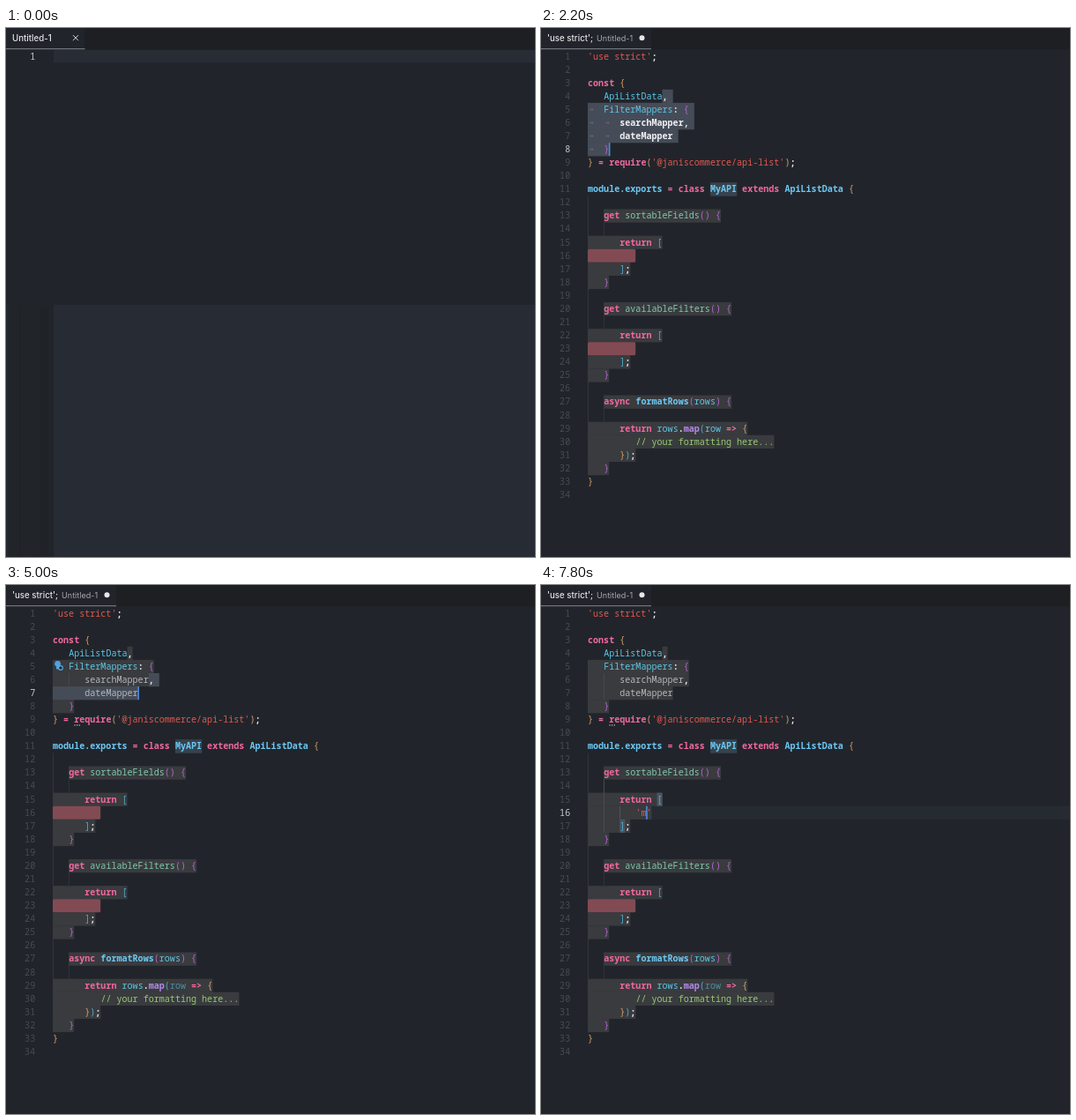
These frames come from a looping animation (600x600 px, 8 s). An HTML page:

```html
<!DOCTYPE html>
<html lang="en">
<head>
<meta charset="utf-8">
<title>Snippet in a code editor</title>
<style>
  html, body { margin: 0; width: 100%; height: 100%; overflow: hidden; background: #21252b; }
  svg { display: block; width: 600px; height: 600px; }
  text { font: 500 10.07px "Noto Sans Mono", "DejaVu Sans Mono", monospace; fill: #c9ccd2; white-space: pre; }
  .ui { font: 500 9.7px Inter, "Open Sans", sans-serif; fill: #e4e5e7; }
  .faint { font-size: 9.1px; font-weight: 400; fill: #a3a6aa; }
  .num { fill: #464b53; text-anchor: end; }
  .num.on { fill: #c6c9ce; }
  .note { font-size: 8.6px; fill: #85888e; text-anchor: end; }
  .gone { fill: #777a80; text-decoration: line-through; }
  .b { font-weight: 800; fill: #f1f2f4; }
  .k { fill: #f2689f; font-weight: 700; }
  .s { fill: #e4574f; }
  .c { fill: #5cc5e6; }
  .m { fill: #6cc8f4; font-weight: 600; }
  .f { fill: #7fc8ad; }
  .o { fill: #d79d68; }
  .p { fill: #b566cc; }
  .l { fill: #4fa9cd; }
  .v { fill: #b48ae8; font-weight: 600; }
  .g { fill: #98ca70; }
  .w { fill: #e8eaed; font-weight: 600; }
  .u { fill: #f0f1f3; font-weight: 600; }
  .r { fill: #5cc5e6; }
  .dim .u { fill: #b3b6bb; font-weight: 500; }
  .dim .r { fill: #4a8fa4; }
</style>
</head>
<body>
<svg id="stage" viewBox="0 0 600 600"></svg>
<script>
(() => {
const LOOP = 8000, LEFT = 53, CHAR = 6.042, PITCH = 15.076;
const stage = document.getElementById('stage');

const rowY = n => 24.6 + (n - 1) * PITCH;
const colX = c => LEFT + c * CHAR;
const rect = (x, y, w, h, fill, extra = '') =>
  `<rect x="${x}" y="${y}" width="${w}" height="${h}" fill="${fill}" ${extra}/>`;
const text = (x, y, body, cls = '') => `<text x="${x}" y="${y}" class="${cls}">${body}</text>`;
const path = (d, color, width = 1) =>
  `<path d="${d}" fill="none" stroke="${color}" stroke-width="${width}"/>`;

// "~k" before a run of text gives it the class "k"
const paint = src => src.split('~').slice(1)
  .map(run => `<tspan class="${run[0]}">${run.slice(1)}</tspan>`).join('');
const code = (n, indent, src) => text(colX(indent), rowY(n) + 10.9, paint(src));
const number = (n, on) => text(33.2, rowY(n) + 10.9, n, on ? 'num on' : 'num');
const mark = (color, spans) => spans.map(([n, a, b]) =>
  rect(colX(a), rowY(n), (b - a) * CHAR, PITCH + 0.1, color)).join('');
const cursor = (n, c) => rect(colX(c) - 0.3, rowY(n), 1.6, PITCH, '#4b8bea');

const LINES = [
  [1, 0, "~s'use strict'~w;"],
  [3, 0, '~kconst ~o{'],
  [4, 3, '~cApiListData~w,'],
  [5, 3, '~cFilterMappers~w: ~p{'],
  [6, 6, '~usearchMapper~w,'],
  [7, 6, '~udateMapper'],
  [8, 3, '~p}'],
  [9, 0, "~o} ~k= require~o(~s'@janiscommerce/api-list'~o)~w;"],
  [11, 0, '~mmodule.exports ~k= class ~mMyAPI ~kextends ~mApiListData ~o{'],
  [13, 3, '~kget ~fsortableFields~p() {'],
  [15, 6, '~kreturn ~l['],
  [17, 6, '~l]~w;'],
  [18, 3, '~p}'],
  [20, 3, '~kget ~favailableFilters~p() {'],
  [22, 6, '~kreturn ~l['],
  [24, 6, '~l]~w;'],
  [25, 3, '~p}'],
  [27, 3, '~kasync ~mformatRows~p(~crows~p) {'],
  [29, 6, '~kreturn ~crows~w.~vmap~l(~rrow ~k=> ~o{'],
  [30, 9, '~g// your formatting here...'],
  [31, 6, '~o}~l)~w;'],
  [32, 3, '~p}'],
  [33, 0, '~o}']
];

const FIELDS = [
  [4, 14, 15], [5, 0, 19], [6, 0, 19], [7, 0, 16], [8, 0, 4], [11, 23, 28],
  [13, 3, 25], [15, 0, 14], [17, 0, 8], [18, 0, 4],
  [20, 3, 27], [22, 0, 14], [24, 0, 8], [25, 0, 4],
  [27, 3, 27], [29, 0, 30], [30, 0, 35], [31, 0, 9], [32, 0, 4]
];

// Snippet stops in the order they are reached
const STOPS = [
  { at: 2000, line: 8, end: 4, sel: [[4, 14, 16], [5, 0, 20], [6, 0, 20], [7, 0, 17], [8, 0, 4]] },
  { at: 4200, line: 7, end: 16, sel: [[6, 18, 20], [7, 0, 16]] },
  { at: 5400, line: 11, end: 28, sel: [[11, 23, 28]] },
  { at: 6000, line: 18, end: 4,
    sel: [[13, 3, 26], [14, 0, 1], [15, 0, 15], [16, 0, 10], [17, 0, 9], [18, 0, 4]] },
  { at: 6600, line: 16, end: 9, sel: [] }
];

const ITEMS = [
  ['~bapi~u-generic', 'Create a generic API'],
  ['~bapi~u-get', 'Create an API Get'],
  ['~bapi~u-list', 'Create an API List'],
  ['~bapi~u-list-value-mapper', 'API List value mapper'],
  ['~bapi~u-save', 'Create an API Save'],
  ['~bapi~u-test', 'Create an API test'],
  ['~bapi~u-test-item', 'Create an api test item'],
  ['~bA~xud~bi~xo~bP~xaram'],
  ['~bA~xud~bi~xo~bP~xaramMap'],
  ['~xAudioProcessingEvent', '', 'gone'],
  ['~bA~xn~bi~xmation~bP~xlaybackEvent'],
  ['~ba~xfterDescr~bip~xtion']
];

function tab(label, name, nameX, end, dirty) {
  const close = end - 10.5;
  return rect(0, 0, 600, 24.4, '#1d1f23') + rect(0, 0, end, 24.4, '#21242a') +
    rect(0, 23.2, end, 1, '#85898f') +
    (label ? text(7, 14.8, label, 'ui') : '') +
    text(nameX, 14.8, name, label ? 'ui faint' : 'ui') +
    (dirty ? `<circle cx="${close}" cy="11.2" r="3" fill="#e6e7e9"/>`
           : path(`M${close - 3} 8.2l6 6m0-6l-6 6`, '#d5d7da'));
}

function lowerPanel(x) {
  return rect(0, 314, 600, 286, '#21252a') + rect(0, 314, 3, 286, '#24282f') +
    rect(15, 318, 1, 282, '#1d2125') + rect(38, 318, 10, 282, '#1f2327') +
    rect(x, 314, 600 - x, 286, '#272b33');
}

function popup(picked) {
  const rows = ITEMS.map(([name, note, cls], i) => {
    const y = rowY(i + 2) + 0.8;
    const scope = i > 6 && i < 11;
    const icon = scope
      ? path(`M76 ${y + 4}h-2v7h2m6-7h2v7h-2M77 ${y + 10}l4-5`, '#58aee6') +
        `<circle cx="79" cy="${y + 7.5}" r="2.1" fill="none" stroke="#58aee6"/>`
      : rect(74.8, y + 3, 9, 9, 'none', 'stroke="#c4c7cb" stroke-width="1"');
    return (i === picked ? rect(72, y, 318, PITCH, '#292c32') : '') + icon +
      text(88, y + 10.7, paint(name), cls) +
      (note ? text(388, y + 10.4, note, 'note') : '');
  }).join('');
  return rect(72, 40, 328, 183, '#1c1f23') + rows + rect(389.5, 40.5, 6, 116, '#2b2f35');
}

function typingScene(t) {
  const typed = 'api'.slice(0, Math.max(0, Math.floor((t - 400) / 200)));
  const picked = t < 1600 ? 0 : t < 1800 ? 1 : 2;
  return lowerPanel(typed ? 52 : 54) + rect(54, 25, 546, 14.4, '#282c34') +
    tab(typed, 'Untitled-1', typed ? 25 : 7, 89.5, !!typed) + number(1, true) +
    text(LEFT, rowY(1) + 10.9, typed) + (t >= 1000 ? popup(picked) : '');
}

const blank = n => rect(LEFT, rowY(n), 54.2, PITCH, '#824b54', 'rx="1.5"');
const guide = (c, a, b, color) => rect(colX(c), rowY(a), 0.8, rowY(b + 1) - rowY(a), color);

function arrows() {
  const at = [[5, 0], [6, 0], [6, 3], [7, 0], [7, 3], [8, 0]];
  return at.map(([n, c]) =>
    path(`M${colX(c) + 2} ${rowY(n) + 7.5}h4m-1.5-1.5l1.5 1.5l-1.5 1.5`, '#6a707a', 0.7)).join('');
}

function bulb() {
  return '<circle cx="58.6" cy="89.3" r="3.4" fill="#4aa3e8"/>' +
    rect(57, 92, 3.2, 3.4, '#4aa3e8') +
    '<circle cx="62" cy="94" r="2.3" fill="#21252b" stroke="#58aee6" stroke-width="1.2"/>';
}

function editorScene(t) {
  const step = STOPS.findLastIndex(s => t >= s.at);
  const stop = STOPS[step];
  const onList = stop.line === 16;
  const quotes = t >= 7400, letter = t >= 7800;
  const settled = t >= 2800;
  let out = tab("'use strict';", 'Untitled-1', 63, 125, true);

  if (onList) out += rect(LEFT, rowY(16), 547, PITCH, '#262a31');
  out += mark('#393b3e', FIELDS);
  if (quotes) out += mark('#393b3e', [[16, 0, letter ? 12 : 11]]);
  out += mark('#36434d', [[11, 23, 28]]) + mark('#454c58', stop.sel);
  if (onList) out += mark('#4b555f', [[15, 13, 14], [17, 6, 7]]);

  out += guide(0, 12, 32, '#373b41') + guide(3, 14, 14, '#33383e') +
    guide(3, 21, 21, '#33383e') + guide(3, 28, 28, '#33383e') + guide(3, 6, 7, '#474b52');
  if (onList) out += guide(3, 14, 17, '#4c5158');
  if (quotes) out += guide(6, 16, 16, '#565b62');
  out += (quotes ? '' : blank(16)) + blank(23);
  if (step === 0) out += arrows();

  for (let n = 1; n <= 34; n++) out += number(n, n === stop.line);
  const body = LINES.map(line => code(...line)).join('');
  out += `<g class="${settled ? 'dim' : ''}">${body}</g>`;
  if (quotes) out += code(16, 9, letter ? "~s'm'" : "~s''");

  if (settled) {
    for (let i = 0; i < 3; i++) out += rect(77.5 + i * 2.6, 158.4, 1.2, 1.2, '#c5c8cc');
    if (step < 2) out += bulb();
  }
  return out + cursor(stop.line, letter ? 11 : quotes ? 10 : stop.end);
}

let shown = -1;
function draw(now) {
  const t = Math.floor(now % LOOP / 200) * 200;
  if (t !== shown) {
    shown = t;
    stage.innerHTML = rect(0, 0, 600, 600, '#21252b') +
      (t < 2000 ? typingScene(t) : editorScene(t));
  }
  requestAnimationFrame(draw);
}
draw(performance.now());
})();
</script>
</body>
</html>
```
